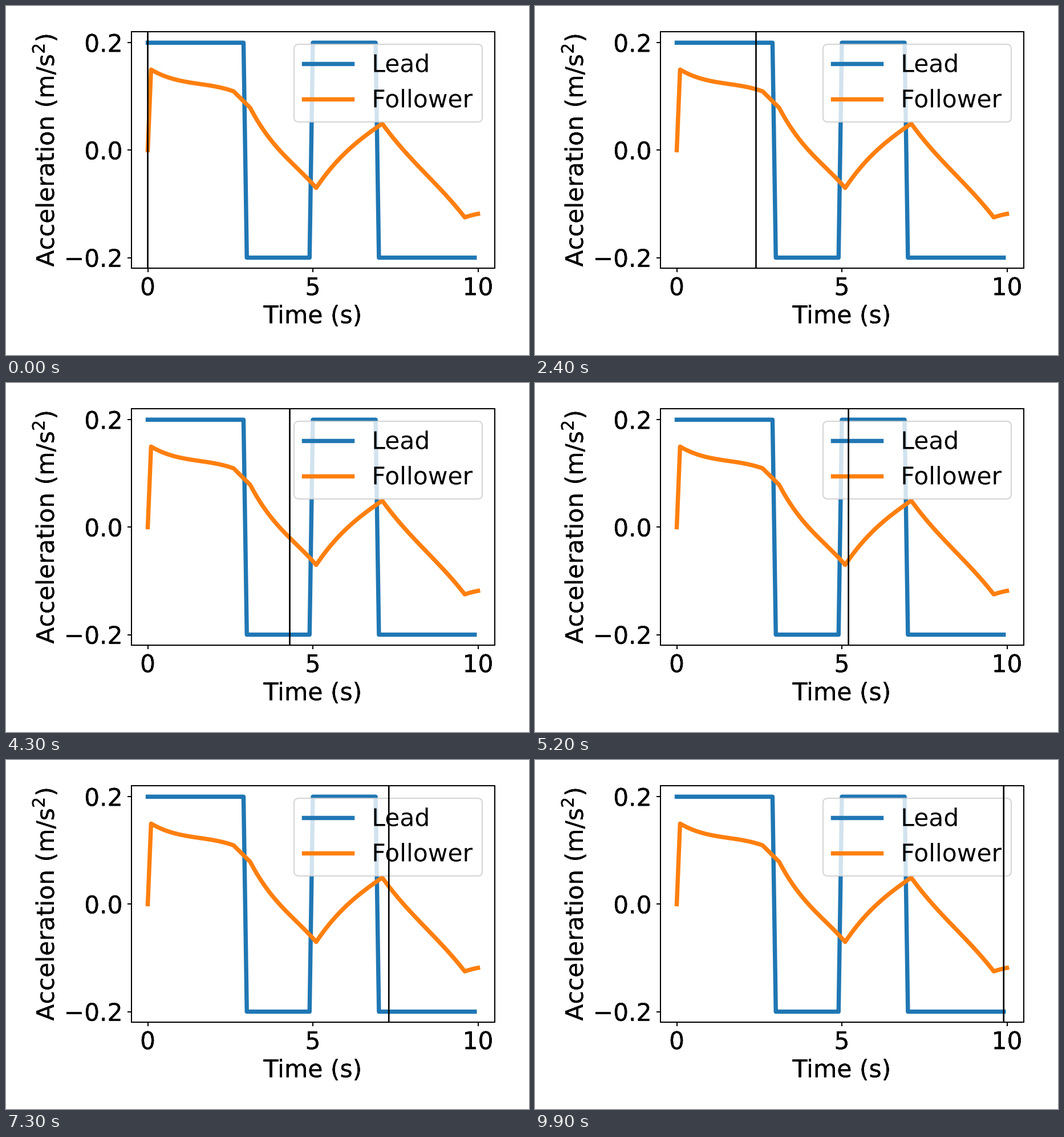
A matplotlib script that plays this animation: 917 px wide and 611 px high, repeating every 10000 ms.

```python
import numpy as np
import matplotlib.pyplot as plt
from matplotlib.animation import FuncAnimation
from matplotlib.patheffects import Normal

W, H, DPI = 917, 611, 128
K = W / 6 / DPI  # point sizes below are meant for a 6 inch wide figure
LEFT, RIGHT, TOP, BOTTOM = 219.6, 856.5, 45.45, 459.4

plt.rcParams.update({
    "font.family": "DejaVu Sans",
    "font.size": 20 * K,
    "text.hinting": "none",
    "axes.linewidth": 0.95 * K,
    "axes.labelpad": 4 * K,
    "patch.linewidth": 1.0 * K,
    "lines.linewidth": 3.5 * K,
})
for axis in ("xtick", "ytick"):
    plt.rcParams.update({
        f"{axis}.major.size": 3.5 * K,
        f"{axis}.major.width": 0.95 * K,
        f"{axis}.major.pad": 3.5 * K,
    })


def outline(texts, passes):
    """Draw texts as sub-pixel outlines; more passes give heavier edges."""
    for text in texts:
        text.set_path_effects([Normal()] * passes)


def lead_accel(t):
    return np.where((t < 3) | ((t >= 5) & (t < 7)), 0.2, -0.2)


def bend(start, end, bow, skew):
    """Curve between two turning points, sampled every 0.1 s."""
    (t0, a0), (t1, a1) = start, end
    u = np.linspace(0, 1, round((t1 - t0) * 10) + 1)
    a = a0 + (a1 - a0) * u + u * (1 - u) * (bow + skew * (1 - 2 * u))
    return np.column_stack([t0 + (t1 - t0) * u, a])


# Turning points of the follower, and the bow and skew between them.
turns = [(0, 0), (0.1, 0.15), (2.6, 0.1095), (3.1, 0.079),
         (5.1, -0.0702), (7.1, 0.0495), (9.6, -0.125), (10, -0.1185)]
bends = [(0, 0), (-0.018, -0.033), (0, 0), (-0.047, -0.039),
         (0.049, 0.015), (-0.008, -0.03), (0.002, 0)]
follower = np.vstack([bend(p, q, *b)
                      for p, q, b in zip(turns, turns[1:], bends)])

fig = plt.figure(figsize=(W / DPI, H / DPI), dpi=DPI, facecolor="white")
ax = fig.add_axes([LEFT / W, 1 - BOTTOM / H,
                   (RIGHT - LEFT) / W, (BOTTOM - TOP) / H])
ax.set(xlim=(-0.5, 10.5), ylim=(-0.22, 0.22),
       xticks=[0, 5, 10], yticks=[-0.2, 0, 0.2],
       xlabel="Time (s)", ylabel="Acceleration (m/s$^2$)")

t = np.arange(100) / 10
ax.plot(t, lead_accel(t), color="#1f77b4", label="Lead")
ax.plot(*follower.T, color="#ff7f0e", label="Follower")
legend = ax.legend(loc="upper right")
cursor = ax.axvline(0, color="black", lw=1.25 * K, zorder=10, snap=False)

outline([ax.xaxis.label, ax.yaxis.label,
         *ax.get_xticklabels(), *ax.get_yticklabels()], 3)
outline(legend.get_texts(), 1)


def update(i):
    x = i / 10
    cursor.set_xdata([x, x])
    return [cursor]


anim = FuncAnimation(fig, update, frames=100, interval=100, repeat=True,
                     repeat_delay=0, blit=False)
plt.show()
```
